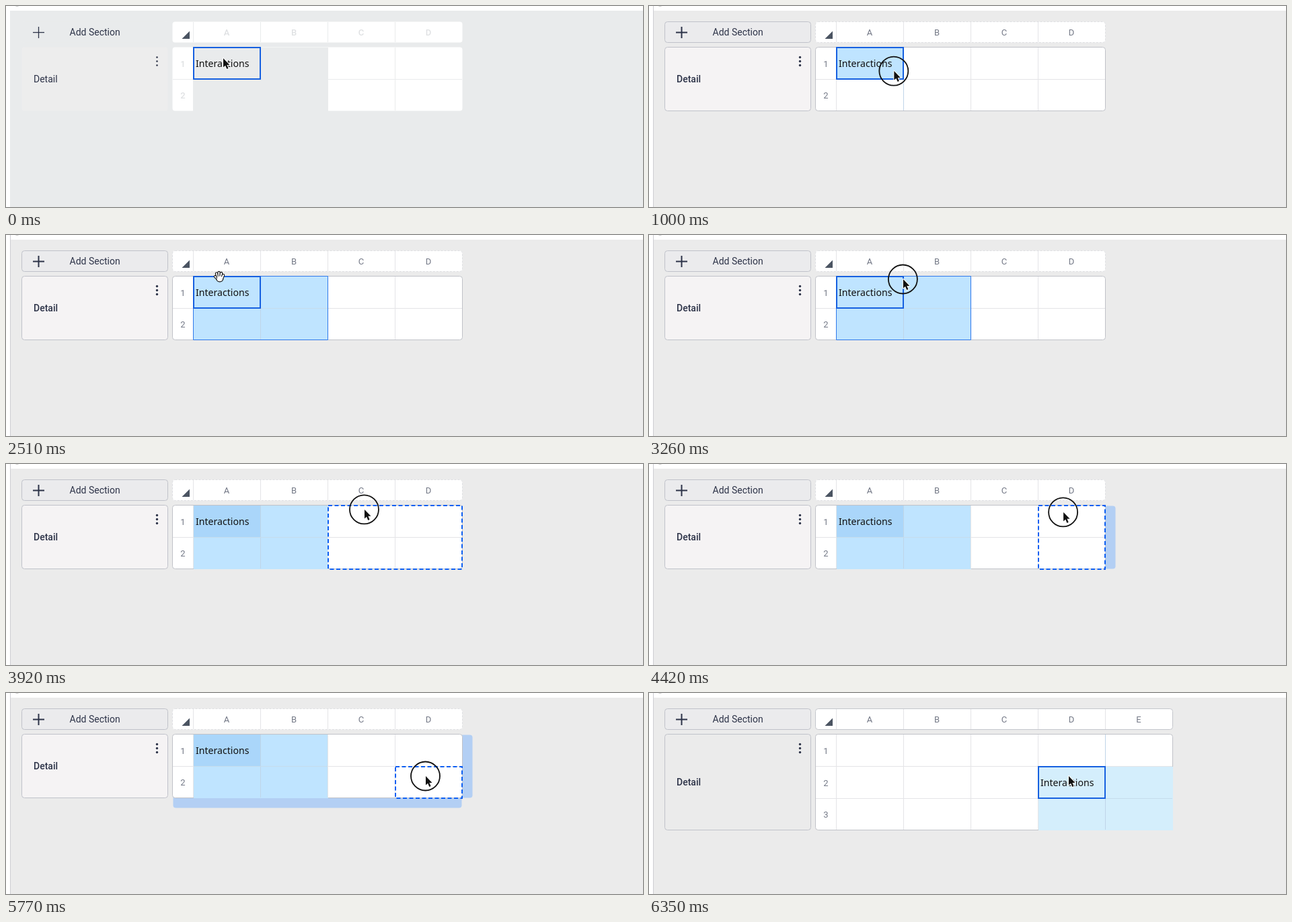
Animation of 947 by 300 pixels, one loop 6.52 s. Source, as an HTML page with a canvas:

```html
<!DOCTYPE html>
<html lang="en">
<head>
<meta charset="utf-8">
<title>Dragging a cell range</title>
<style>
  html, body { margin: 0; width: 100%; height: 100%; overflow: hidden; background: #fff; }
  canvas { display: block; }
</style>
</head>
<body>
<canvas id="stage" width="947" height="300"></canvas>
<script>
const g = document.getElementById('stage').getContext('2d');
const LOOP = 6520, FPS = 12;
const SELECT = 750, RELEASE = 1420, GRAB = 2711, DROP = 5930;
const LEFT = 278, TOP = 61, COL = 100, ROW = 48;
const BLUE = '#1660e0', INK = '#2d3348';

// Cursor tracks: [time, position], eased between points
const trackX = [[0, 323], [750, 323], [1290, 416], [1500, 416], [2300, 317], [GRAB, 317], [4597, 624]];
const trackY = [[0, 78], [750, 78], [1290, 121], [1500, 121], [2300, 62], [GRAB, 62],
  [3260, 66], [4000, 68], [4597, 73], [4950, 73], [5560, 124]];

function valueAt(track, t) {
  const i = track.findIndex(point => point[0] > t);
  if (i < 0) return track[track.length - 1][1];
  const [t0, a] = track[i - 1], [t1, b] = track[i];
  const u = (t - t0) / (t1 - t0);
  return a + (b - a) * u * u * (3 - 2 * u);
}

function fillRect(color, x, y, w, h) {
  g.fillStyle = color;
  g.fillRect(x, y, w, h);
}

function panel(x, y, w, h, fill, border, dash = []) {
  g.beginPath();
  g.roundRect(x + .5, y + .5, w - 1, h - 1, 4);
  g.fillStyle = fill;
  g.fill();
  if (border) strokePath(border, 1, dash);
}

function strokePath(color, width, dash = []) {
  g.strokeStyle = color;
  g.lineWidth = width;
  g.setLineDash(dash);
  g.stroke();
  g.setLineDash([]);
}

function line(color, width, x1, y1, x2, y2) {
  g.beginPath();
  g.moveTo(x1, y1);
  g.lineTo(x2, y2);
  strokePath(color, width);
}

function frame(color, width, x, y, w, h, dash) {
  g.beginPath();
  g.rect(x, y, w, h);
  strokePath(color, width, dash);
}

function polygon(points, fill) {
  g.beginPath();
  points.forEach(([x, y]) => g.lineTo(x, y));
  g.closePath();
  g.fillStyle = fill;
  g.fill();
}

function text(string, x, y, color, font, align = 'left') {
  g.font = font;
  g.fillStyle = color;
  g.textAlign = align;
  g.fillText(string, x, y);
}

function circle(x, y, r) {
  g.beginPath();
  g.arc(x, y, r, 0, 2 * Math.PI);
}

const colX = c => LEFT + c * COL;
const rowY = r => TOP + r * ROW;

function drawSidebar(faded, dropped, bodyHeight) {
  const border = faded ? null : '#c0c2ca';
  const weight = faded ? 400 : 500;
  panel(23, 23, 218, 32, faded ? '#e9ebec' : '#ebebed', border);
  panel(23, TOP, 218, bodyHeight, faded ? '#ededed' : dropped ? '#ebebeb' : '#f5f3f4', border);
  line(INK, faded ? 1.3 : 2, 40, 39.5, 57, 39.5);
  line(INK, faded ? 1.3 : 2, 48.5, 31, 48.5, 48);
  text('Add Section', 94.5, 44, INK, '400 14px Roboto, sans-serif');
  text('Detail', 41, TOP + bodyHeight / 2 + 5, INK, `${weight} 14px Roboto, sans-serif`);
  for (const y of [76.5, 82.5, 88.5]) {
    circle(224.5, y, faded ? 1.3 : 1.7);
    g.fillStyle = INK;
    g.fill();
  }
}

function drawTable(state) {
  const { faded, dropped, dragging, cols, rows, bodyHeight, sel, target } = state;
  const width = 31 + cols * COL;
  const label = faded ? '#dfe1e3' : '#747987';
  const grid = faded ? '#e9ebec' : '#e4e4e7';
  const labelFont = `${faded ? 500 : 400} 13px Roboto, sans-serif`;

  // Strips announcing a new column or row
  if (target && target.c + 2 > cols) panel(674, TOP + 1, 20, bodyHeight - 1, '#b3cff4');
  if (target && target.r + 2 > rows) panel(248, 150, 430, 22, '#b3cff4');

  panel(247, 23, width + 1, 32, '#fff', faded ? null : dropped ? '#c4c6cc' : '#dedfe2', dropped ? [] : [3, 2]);
  panel(247, TOP, width + 1, bodyHeight, '#fff', faded ? null : '#c0c2c8');
  polygon([[273, 37.5], [273, 49], [261.5, 49]], '#4b5462');

  if (faded) fillRect('#e9ebec', LEFT, TOP + 1, 2 * COL + 1, bodyHeight - 1);
  else {
    const height = Math.min(sel.h * ROW, bodyHeight - sel.r * ROW) - 1;
    fillRect(dropped ? '#d4eefc' : '#bfe4ff', colX(sel.c) + 1, rowY(sel.r) + 1, sel.w * COL, height);
    if (dragging) fillRect('#aad6fa', LEFT + 1, TOP + 1, COL, ROW - 1);
  }

  for (let c = 0; c < cols; c++) {
    const x = colX(c) + .5;
    line(grid, 1, x, 24, x, 54);
    if (!faded || c !== 1) {
      const shade = !faded && c === sel.c + 1 ? '#bfd5e8' : grid;
      line(shade, 1, x, TOP + 1, x, TOP + bodyHeight - 1);
    }
    text('ABCDE'[c], colX(c) + 50, 43.5, label, labelFont, 'center');
  }
  for (let r = 0; r < rows; r++) {
    const last = r === rows - 1;
    text(r + 1, 263, rowY(r) + (last ? 76.5 - ROW : 77.5 - ROW) + .5, label, labelFont, 'center');
    if (r) {
      const y = rowY(r) + .5;
      line(grid, 1, 248, y, LEFT, y);
      line(grid, 1, faded ? colX(2) : LEFT, y, colX(cols), y);
      if (!faded && sel.r < r && r < sel.r + sel.h) {
        line('#c5dcec', 1, colX(sel.c) + 1, y, colX(sel.c + sel.w), y);
      }
    }
  }

  if (!dragging) {
    if (!faded && !dropped) {
      frame('#2f78ea', 1, LEFT + .5, TOP + .5, sel.w * COL, sel.h * ROW - (sel.h === rows ? 1 : 0));
    }
    frame(BLUE, 2, colX(sel.c) + 1, rowY(sel.r) + 1, COL - 1, ROW - 1);
  }
  text('Interactions', colX(sel.c) + 4, rowY(sel.r) + 30, '#111', '14.1px "Noto Sans", sans-serif');

  if (target) {
    const x = colX(target.c) + 1, y = rowY(target.r) + 1;
    const w = Math.min(2, cols - target.c) * COL - 1;
    const h = Math.min(2, rows - target.r) * ROW - 1;
    frame('#0d5ff2', 2, x, y, w, h, [6, 3.5]);
  }
}

function drawArrow() {
  const points = [[0, 0], [0, 13.5], [3.1, 10.8], [5.3, 16], [7.6, 15], [5.4, 9.9], [9.5, 9.9]];
  polygon(points, '#111');
  g.lineJoin = 'round';
  strokePath('#fff', 2);
  polygon(points, '#111');
}

function drawHand() {
  const fingers = [[-6, 0, -2, 4], [-4, -4.5, -1.5, 3], [-.5, -6, 0, 3], [3, -5, 2, 3], [6, -2, 4, 3]];
  g.lineCap = 'round';
  g.beginPath();
  g.ellipse(.8, 3.2, 4.6, 4.2, 0, 0, 2 * Math.PI);
  strokePath('#111', 2);
  for (const f of fingers) {
    line('#111', 4.4, ...f);
    line('#fff', 2.2, ...f);
  }
  g.beginPath();
  g.ellipse(.8, 3.4, 4.2, 3.8, 0, 0, 2 * Math.PI);
  g.fillStyle = '#fff';
  g.fill();
  g.lineCap = 'butt';
}

function drawCursor(x, y, pressed, hand) {
  g.save();
  g.translate(x, y);
  if (pressed) {
    circle(-.5, 0, 21.5);
    strokePath('#111', 1.8);
  }
  hand ? drawHand() : drawArrow();
  g.restore();
}

function draw(t) {
  const x = valueAt(trackX, t), y = valueAt(trackY, t);
  const faded = t < SELECT, dropped = t >= DROP;
  const grabbed = t >= GRAB && !dropped;
  const pressed = grabbed || (t >= SELECT && t < RELEASE);
  const cell = { c: x > 381 ? Math.floor((x - LEFT) / COL) : 0, r: y > 109 ? 1 : 0 };
  const dragging = grabbed && cell.c > 0;
  const bodyHeight = dropped ? 144 : 96;

  let sel = { c: 0, r: 0, w: 2, h: 2 };
  if (t < RELEASE) sel = { c: 0, r: 0, w: cell.c ? 2 : 1, h: cell.r + 1 };
  if (dropped) sel = { c: 3, r: 1, w: 2, h: 2 };

  fillRect('#fff', 0, 0, 947, 300);
  fillRect(faded ? '#e9ebec' : '#ebebeb', 6, 7, 941, 293);
  if (!faded) line('#cdcdd2', 1, 6.5, 0, 6.5, 300);
  circle(16.5, -3, 3.5);
  strokePath('#bbb', 1);

  drawSidebar(faded, dropped, bodyHeight);
  drawTable({
    faded, dropped, dragging, bodyHeight, sel,
    cols: dropped ? 5 : 4,
    rows: dropped ? 3 : 2,
    target: dragging ? cell : null
  });
  drawCursor(x, y, pressed, t >= 2250 && t < GRAB);
}

function tick() {
  const t = performance.now() % LOOP;
  draw(Math.floor((t + 5) * FPS / 1000) * 1000 / FPS);
  requestAnimationFrame(tick);
}
tick();
</script>
</body>
</html>
```
